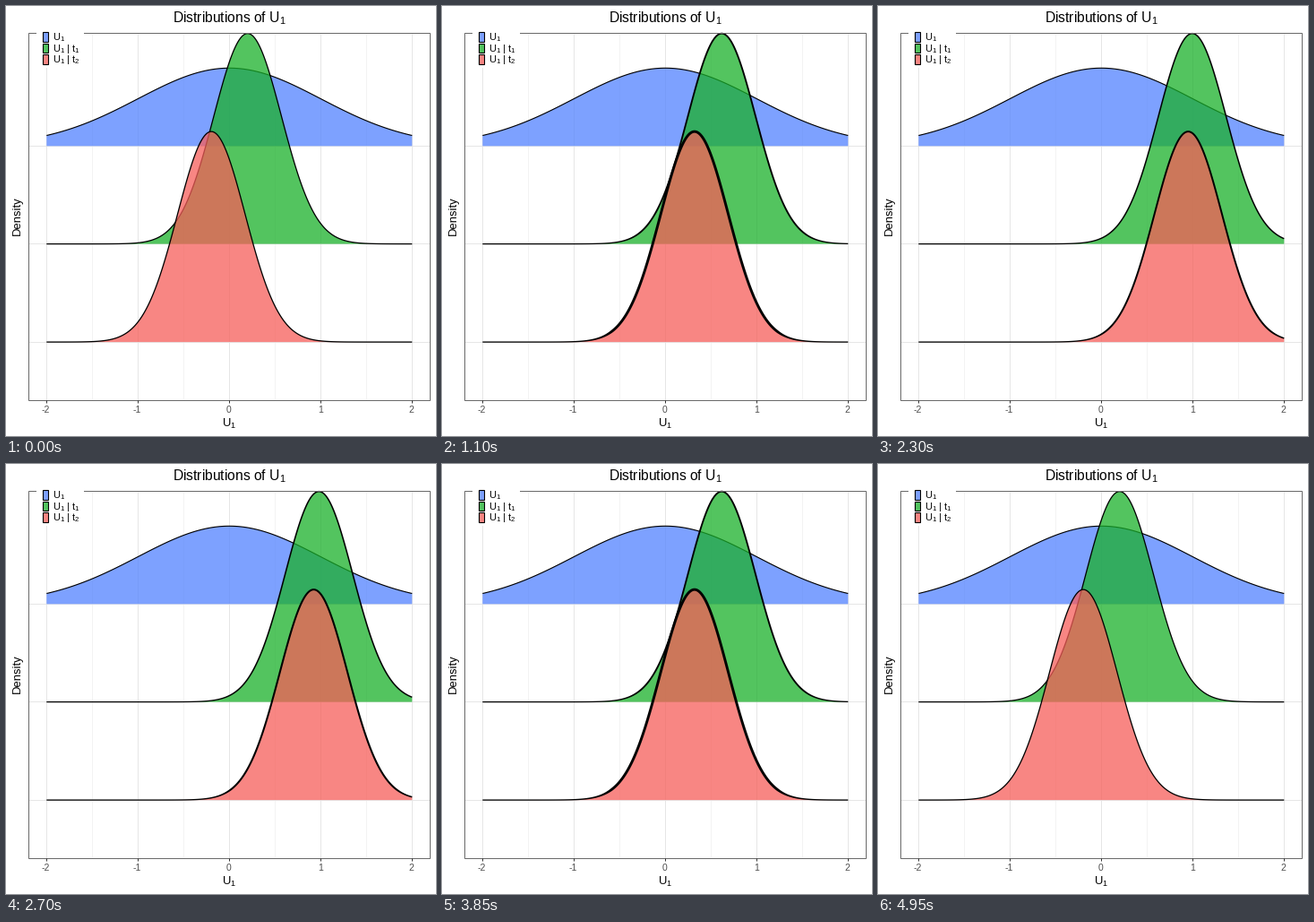
These frames come from a looping animation (480x480 px, 5 s). A matplotlib script:

```python
import numpy as np
import matplotlib.pyplot as plt
from matplotlib.animation import FuncAnimation
from matplotlib.patches import Rectangle

plt.rcParams["font.family"] = "Liberation Sans"

SIZE, DPI = 480, 72          # at 72 dpi one point is one pixel
FRAMES, INTERVAL = 100, 50
LEFT, RIGHT, TOP, BOTTOM = 25, 473, 30, 440
CENTER, UNIT = 249.3, 102.0
BASELINES = (156.3, 265.6, 375.1)
PEAK = 87.0                  # height of the standard normal
SIGMA = 0.3703
BLUE, GREEN, RED = (np.array(c) / 255 for c in
                    ((82, 130, 255), (26, 176, 42), (246, 94, 89)))
ALPHA = 0.75
U = "U$_\\mathregular{1}$"

fig = plt.figure(figsize=(SIZE / DPI, SIZE / DPI), dpi=DPI, facecolor="white")
ax = fig.add_axes([0, 0, 1, 1])
ax.set_xlim(0, SIZE)
ax.set_ylim(SIZE, 0)
ax.axis("off")

u = np.linspace(-2, 2, 409)
xs = CENTER + UNIT * u


def line(x, y, color, width, z):
    ax.plot(x, y, color=color, lw=width, zorder=z, solid_capstyle="butt")


def label(x, y, text, size, color="black", ha="center", **kw):
    ax.text(x, y, text, fontsize=size, color=color, ha=ha, va="baseline",
            zorder=20, **kw)


def heights(mean, sigma):
    return PEAK / sigma * np.exp(-0.5 * ((u - mean) / sigma) ** 2)


class Ridge:
    """Filled density whose outline can grow heavier away from its tails."""

    def __init__(self, base, color, sigma, z):
        self.base, self.sigma = base, sigma
        self.fill = self.shape(color, ALPHA, z)
        self.outline = self.shape("black", 1, z + 0.5)

    def shape(self, color, alpha, z):
        return ax.fill(xs, xs * 0 + self.base, color=color, alpha=alpha,
                       lw=0, zorder=z, snap=False)[0]

    def draw(self, mean, extra=0.0, width=1.3):
        h = heights(mean, self.sigma)
        pts = np.column_stack([xs, self.base - h])
        floor = [[xs[-1], self.base], [xs[0], self.base]]
        self.fill.set_xy(np.vstack([pts, floor]))

        # the outline is a ribbon, so that its weight can vary
        slope = np.gradient(pts[:, 1], xs)
        normal = np.column_stack([-slope, np.ones_like(slope)])
        normal /= np.hypot(1, slope)[:, None]
        half = (width + extra * np.clip(h / 12, 0, 1))[:, None] / 2
        self.outline.set_xy(np.vstack([pts + half * normal,
                                       (pts - half * normal)[::-1]]))


# grid, ticks and frame
for half in range(-4, 5):
    x = int(CENTER + UNIT * half / 2)
    major = half % 2 == 0
    line([x, x], [TOP, BOTTOM], "#e6e6e6" if major else "#ececec",
         1.0 if major else 0.6, 1)
    if major:
        line([x, x], [BOTTOM, BOTTOM + 3], "#333333", 1, 11)
        label(x - 0.3, 454.3, str(half // 2), 10.4, "#4d4d4d")
for y in BASELINES:
    line([LEFT, RIGHT], [int(y)] * 2, "#e6e6e6", 1.0, 1)
ax.add_patch(Rectangle((LEFT, TOP), RIGHT - LEFT, BOTTOM - TOP, fill=False,
                       ec="#6a6a6a", lw=1, zorder=10))

# legend
ax.add_patch(Rectangle((34, 23), 53, 46, fc="white", lw=0, zorder=12))
names = (U, U + " | t$_\\mathregular{1}$", U + " | t$_\\mathregular{2}$")
for i, (color, name) in enumerate(zip((BLUE, GREEN, RED), names)):
    y = 29 + 12.6 * i
    tint = 1 - ALPHA + ALPHA * color
    ax.add_patch(Rectangle((41.4, y), 5.5, 10.6, fc=tint, ec="black", lw=1.1,
                           zorder=13))
    label(52.5, y + 9, name, 11, ha="left")

# titles
label(249.5, 18.7, "Distributions of " + U, 15.6)
label(249, 469.7, U, 13)
label(16, 234.3, "Density", 13, rotation=90, rotation_mode="anchor")

prior = Ridge(BASELINES[0], BLUE, 1.0, 3)
first = Ridge(BASELINES[1], GREEN, SIGMA, 4)
second = Ridge(BASELINES[2], RED, SIGMA, 5)
prior.draw(0, width=1.15)


def update(frame):
    k = min(frame, FRAMES - 1 - frame)       # there and back
    weight = np.sin(np.pi * k / 53)
    first.draw(0.2 + 0.0205 * k - 0.00007 * k * k, 0.6 * weight)
    second.draw(-0.197 + 0.0221 * k + 0.000062 * k * k, 1.7 * weight)
    return first.fill, first.outline, second.fill, second.outline


anim = FuncAnimation(fig, update, frames=FRAMES, interval=INTERVAL,
                     repeat=True, repeat_delay=0, blit=False)
plt.show()
```
